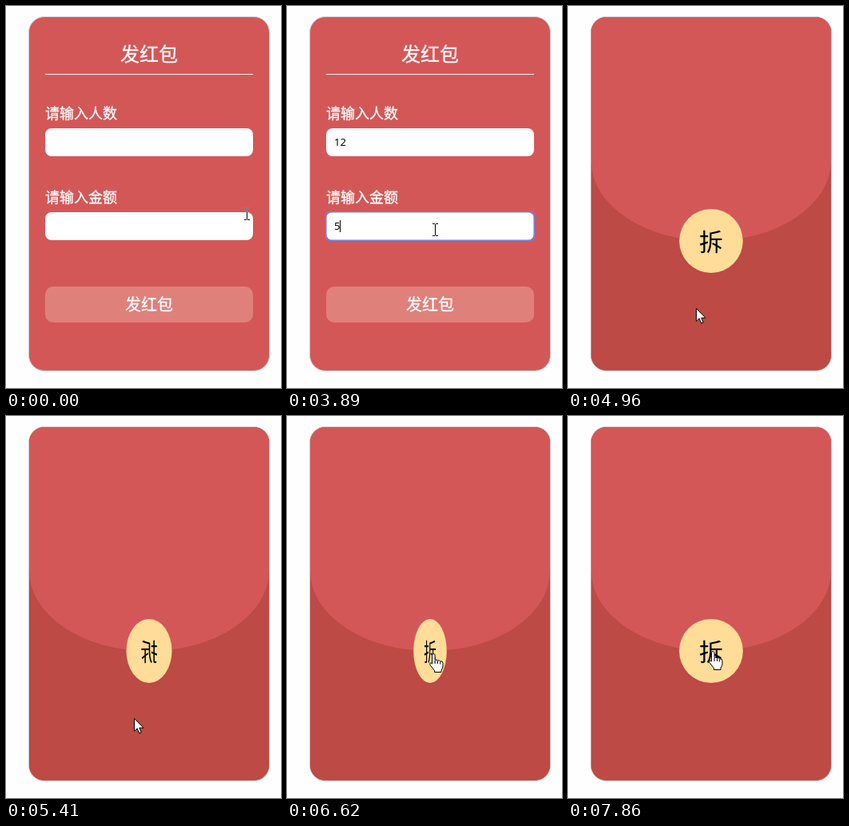
Animation of 344 by 478 pixels, one loop 8 s. Source, as an HTML page:

```html
<!DOCTYPE html>
<html lang="zh-CN">
<head>
<meta charset="utf-8">
<style>
  html, body { margin: 0; width: 100%; height: 100%; overflow: hidden; background: #fefefe; }
  svg { display: block; width: 344px; height: 478px; }
  text { font-family: "Noto Sans CJK SC", "Noto Sans CJK", sans-serif; fill: #fff; }
  #form > text { stroke: #fff; stroke-width: .3; }
  .value { font: 13px "Noto Sans", "Open Sans", sans-serif; fill: #000; }
  .field { fill: #fff; }
  .ring { fill: none; stroke: #6c84e2; stroke-width: 1.6; }
  .mid { text-anchor: middle; }
  .solid { fill: #fff; stroke: #000; }
  .inverted { fill: none; stroke: #fff; mix-blend-mode: difference; }
</style>
</head>
<body>
<svg viewBox="0 0 344 478">
  <defs>
    <clipPath id="card"><rect x="29" y="14" width="300" height="442" rx="19"/></clipPath>
  </defs>
  <rect width="344" height="478" fill="#fefefe"/>
  <rect x="28.5" y="13.5" width="301" height="443" rx="19.5" fill="#d45757" stroke="#d3cccc"/>

  <g id="form">
    <text class="mid" x="179" y="69.3" font-size="24">发红包</text>
    <path d="M49 85.5H309" stroke="#fdf2f2"/>
    <text x="49" y="141" font-size="18">请输入人数</text>
    <g id="people">
      <rect class="field" x="49" y="153" width="260" height="35" rx="8"/>
      <rect class="ring" x="48.8" y="152.8" width="260.4" height="35.4" rx="4"/>
      <text class="value" x="59" y="175"></text>
      <rect class="caret" y="163" width="1" height="15"/>
    </g>
    <text x="49" y="246" font-size="18">请输入金额</text>
    <g id="amount">
      <rect class="field" x="49" y="258" width="260" height="35" rx="8"/>
      <rect class="ring" x="48.8" y="257.8" width="260.4" height="35.4" rx="4"/>
      <text class="value" x="59" y="280"></text>
      <rect class="caret" y="268" width="1" height="15"/>
    </g>
    <rect x="49" y="351" width="260" height="45" rx="10" fill="#e0807b"/>
    <text class="mid" x="179" y="381" font-size="20">发红包</text>
  </g>

  <g id="envelope">
    <g clip-path="url(#card)">
      <path d="M29 14H329V456H29Z" fill="#bd4a44"/>
      <path d="M29 14H329V194A150 100 0 0 1 29 194Z" fill="#d45757"/>
    </g>
    <g id="coin">
      <circle r="40" fill="#ffdc98"/>
      <text class="mid" y="12" font-size="30" style="fill:#000">拆</text>
    </g>
  </g>

  <path id="cursor"/>
</svg>
<script>
const LOOP = 8000, OPEN = 4960;
const HALF_TURN = 731, SPIN_START = 4871;
const FRAME = 138.6, FRAME_START = 4949;
const $ = id => document.getElementById(id);

const shapes = {
  beam: 'M-3.5 .5h3m1 0h3M0 1v14M-3.5 15.5h3m1 0h3',
  arrow: 'M.5 .5V16.5L4.2 13L6.7 19L9.2 18L6.8 12.2H12Z',
  hand: 'M-1.5 2.4A1.8 1.8 0 0 1 2.1 2.4V8.5Q4 7.2 5.5 9Q7.5 8 8.7 10Q12 9.2 12 12.2V16Q12 19 10 21V23.5H1.5V21.5L-4 14.5Q-5 12 -3 11.7L-1.5 13.2Z' +
        'M2.1 9v4M5.5 9.5v3.5M8.7 10.5v3'
};

// start time, shape, x, y
const pointer = [
  [0, 'beam', 301.5, 252], [120, 'arrow', 283, 238], [270, 'arrow', 243, 198], [420, 'beam', 222.5, 168],
  [1960, 'arrow', 195, 246], [2100, 'beam', 187.5, 261], [2220, 'beam', 185.5, 262],
  [3890, 'beam', 185.5, 272], [4010, 'arrow', 172, 330], [4130, 'hand', 160, 378], [4960, 'arrow', 160, 378],
  [6196, 'arrow', 166, 356], [6335, 'hand', 179, 310], [6473, 'hand', 183, 297], [6890, 'hand', 181, 294]
];
// start time, value, caret shown
const people = [[0, '', 0], [820, '', 1], [1250, '', 0], [1530, '1', 1], [1810, '12', 1], [2350, '12', 0]];
const amount = [[0, '', 0], [2350, '', 1], [2910, '', 0], [3470, '', 1], [3620, '5', 1],
  [4130, '5', 0], [4560, '5', 1], [4840, '5', 0]];

const at = (track, t) => track.findLast(key => key[0] <= t);
const show = (element, visible) => { element.style.display = visible ? '' : 'none'; };

function drawField(id, track, t, focused) {
  const [, value, caret] = at(track, t);
  const part = name => $(id).querySelector(name);
  part('.value').textContent = value;
  part('.caret').setAttribute('x', 59 + Math.round(value.length * 7.43));
  show(part('.caret'), caret);
  show(part('.ring'), focused);
}

// Eased half turns, forth and back, shown at the recording's frame rate.
function spin(t) {
  const held = FRAME_START + Math.floor((t - FRAME_START) / FRAME) * FRAME;
  const phase = Math.max(0, held - SPIN_START) / HALF_TURN % 2;
  const p = phase < 1 ? phase : 2 - phase;
  return Math.cos(Math.PI * p * p * (3 - 2 * p));
}

function drawCursor(t) {
  const [, kind, x, y] = at(pointer, t);
  const cursor = $('cursor');
  cursor.setAttribute('d', shapes[kind]);
  cursor.setAttribute('transform', `translate(${x} ${y})`);
  cursor.setAttribute('class', kind === 'beam' ? 'inverted' : 'solid');
}

function draw(now) {
  const t = now % LOOP;
  show($('form'), t < OPEN);
  show($('envelope'), t >= OPEN);
  drawField('people', people, t, t >= 820 && t < 2350);
  drawField('amount', amount, t, t >= 2350 && t < 4840);
  $('coin').setAttribute('transform', `translate(179 294) scale(${spin(t)} 1)`);
  drawCursor(t);
}

const begin = performance.now();
function loop() {
  draw(performance.now() - begin);
  requestAnimationFrame(loop);
}
loop();
</script>
</body>
</html>
```
